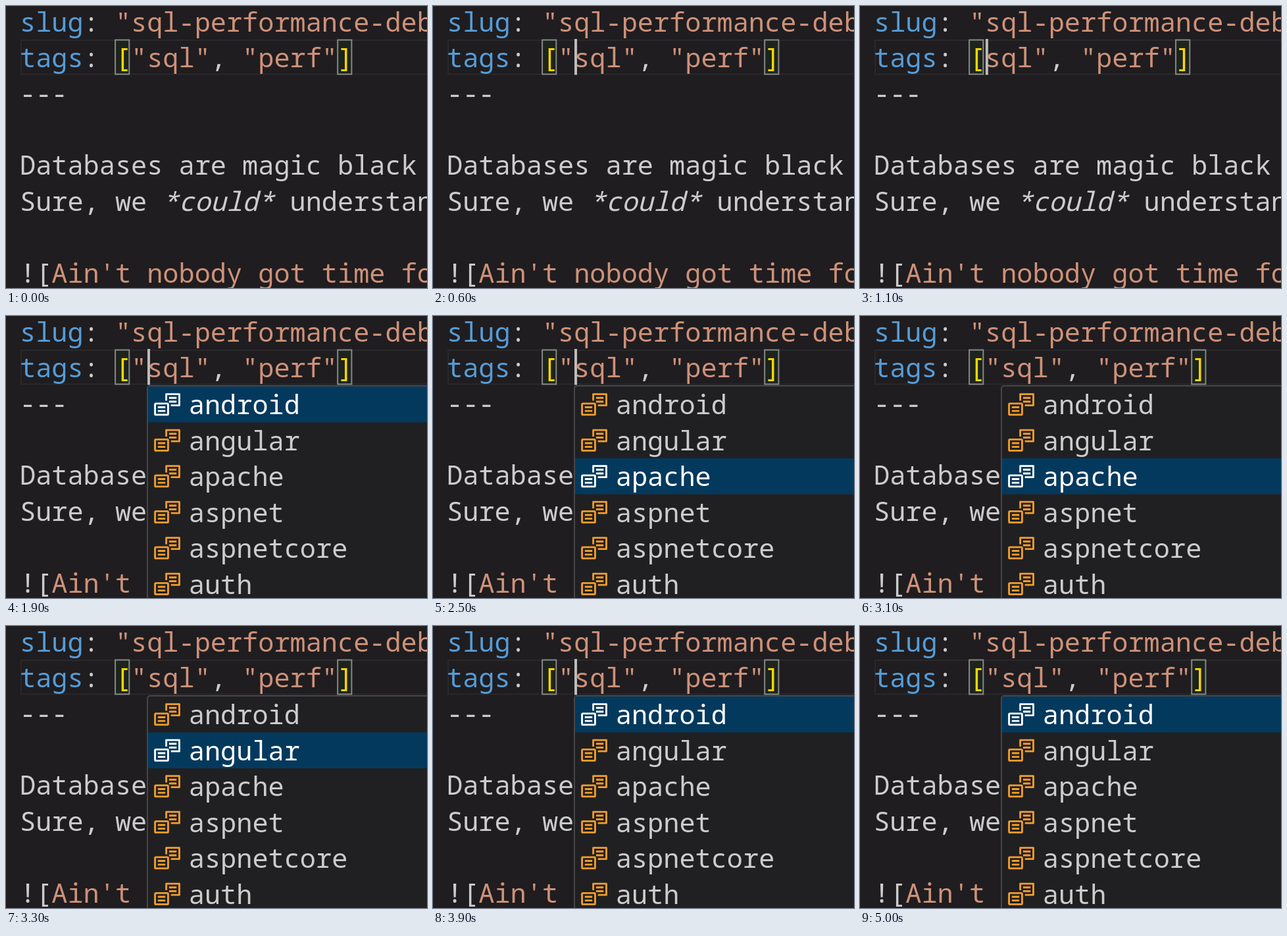
Recreate the animation shown at these times as an HTML page with a canvas. Size 640 px wide and 428 px high, loop 5.2 s.

```html
<!DOCTYPE html>
<html lang="en">
<head>
<meta charset="utf-8">
<title>Editor tag completion</title>
<style>
  html, body { margin: 0; width: 100%; height: 100%; overflow: hidden; background: #1f1d20; }
  canvas { display: block; width: 640px; height: 428px; }
</style>
</head>
<body>
<canvas id="stage" width="640" height="428"></canvas>
<script>
const ctx = document.getElementById("stage").getContext("2d");
const LOOP = 5200;
const SIZE = 40.25, ADVANCE = SIZE * 0.6, LEFT = 21, LINE = 54.45, BASE = 38.55, ROW = 54.5;
const FONT = SIZE + 'px "Noto Sans Mono", "DejaVu Sans Mono", monospace';
const C = {
  bg: "#1f1d20", text: "#cccccc", key: "#569cd6", string: "#ce9178", gold: "#ffd700",
  lineEdge: "#29282a", match: "#868886", cursor: "#bcbcba",
  popup: "#202022", popupEdge: "#464648", selected: "#04395e", icon: "#f39d2b"
};
const ITEMS = ["android", "angular", "apache", "aspnet", "aspnetcore", "auth"];

// [start time, value]
const SELECTION = [[0, 0], [2000, 1], [2200, 2], [2600, 3], [2900, 4],
                   [3000, 3], [3100, 2], [3300, 1], [3400, 0]];
const DELETE_AT = 1000, RETYPE_AT = 1500, POPUP_AT = 1600;

const colX = col => LEFT + col * ADVANCE;
const valueAt = (track, t) => track.filter(([start]) => start <= t).pop()[1];

function write(text, x, y, color, italic) {
  ctx.font = (italic ? "italic " : "") + FONT;
  ctx.fillStyle = color;
  ctx.fillText(text, x, Math.round(y));
}

// Draws coloured runs one after another on an editor line.
function writeLine(row, runs) {
  let col = 0;
  for (const [text, color, italic] of runs) {
    write(text, colX(col), BASE + row * LINE, color, italic);
    col += text.length;
  }
}

function matchBox(col) {
  const x = colX(col) + 0.2;
  ctx.fillStyle = "rgba(0, 100, 0, 0.1)";
  ctx.fillRect(x, 51, 21.2, 53);
  ctx.strokeStyle = C.match;
  ctx.lineWidth = 2;
  ctx.strokeRect(x, 51.5, 21.2, 52);
}

function drawEditor(deleted) {
  ctx.strokeStyle = C.lineEdge;
  ctx.lineWidth = 2;
  ctx.strokeRect(23, 52, 640, 51.5);

  const tag = deleted ? 'sql"' : '"sql"';
  matchBox(6);
  matchBox(deleted ? 19 : 20);

  writeLine(0, [["slug", C.key], [": ", C.text], ['"sql-performance-debug"', C.string]]);
  writeLine(1, [["tags", C.key], [": ", C.text], ["[", C.gold], [tag, C.string],
                [", ", C.text], ['"perf"', C.string], ["]", C.gold]]);
  writeLine(2, [["---", C.text]]);
  writeLine(4, [["Databases are magic black", C.text]]);
  writeLine(5, [["Sure, we ", C.text], ["*could*", C.text, true], [" understand", C.text]]);
  writeLine(7, [["![", C.text], ["Ain't nobody got time for", C.string]]);
}

function polyline(...points) {
  points.forEach(([x, y], i) => i ? ctx.lineTo(x, y) : ctx.moveTo(x, y));
}

function drawIcon(y, color) {
  ctx.save();
  ctx.translate(222.3, y);
  ctx.scale(2.84, 2.84);
  ctx.strokeStyle = color;
  ctx.lineWidth = 1;
  ctx.lineJoin = "round";
  ctx.beginPath();
  ctx.roundRect(1.5, 7.5, 7, 6, 0.5);
  polyline([7.5, 6], [7.5, 2.5], [14.5, 2.5], [14.5, 8.5], [10, 8.5]);
  for (const [x, ly] of [[3, 9.5], [3, 11.5], [9, 4.5], [9, 6.5]]) {
    polyline([x, ly], [x + 4, ly]);
  }
  ctx.stroke();
  ctx.restore();
}

function drawPopup(selected) {
  ctx.fillStyle = C.popup;
  ctx.strokeStyle = C.popupEdge;
  ctx.lineWidth = 2;
  ctx.beginPath();
  ctx.roundRect(215, 106, 500, 400, 4);
  ctx.fill();
  ctx.stroke();
  ITEMS.forEach((name, i) => {
    const top = 107 + i * ROW, active = i === selected;
    if (active) {
      ctx.fillStyle = C.selected;
      ctx.fillRect(216, top, 424, ROW);
    }
    drawIcon(top + 4.5, active ? "#ffffff" : C.icon);
    write(name, 277.8, top + 42, active ? "#ffffff" : C.text);
  });
}

function draw(t) {
  const deleted = t >= DELETE_AT && t < RETYPE_AT;
  ctx.fillStyle = C.bg;
  ctx.fillRect(0, 0, 640, 428);
  drawEditor(deleted);
  if (t >= POPUP_AT) drawPopup(valueAt(SELECTION, t));

  // The caret blinks every half second; editing restarts it visible.
  const visible = t < RETYPE_AT ? t >= 500 : Math.floor((t - RETYPE_AT) / 500) % 2 === 0;
  if (visible) {
    ctx.fillStyle = C.cursor;
    ctx.fillRect(colX(deleted ? 7 : 8) + 0.8, 50, 4, 54.5);
  }
}

const start = performance.now();
function tick() {
  draw((performance.now() - start) % LOOP);
  requestAnimationFrame(tick);
}
tick();
</script>
</body>
</html>
```
